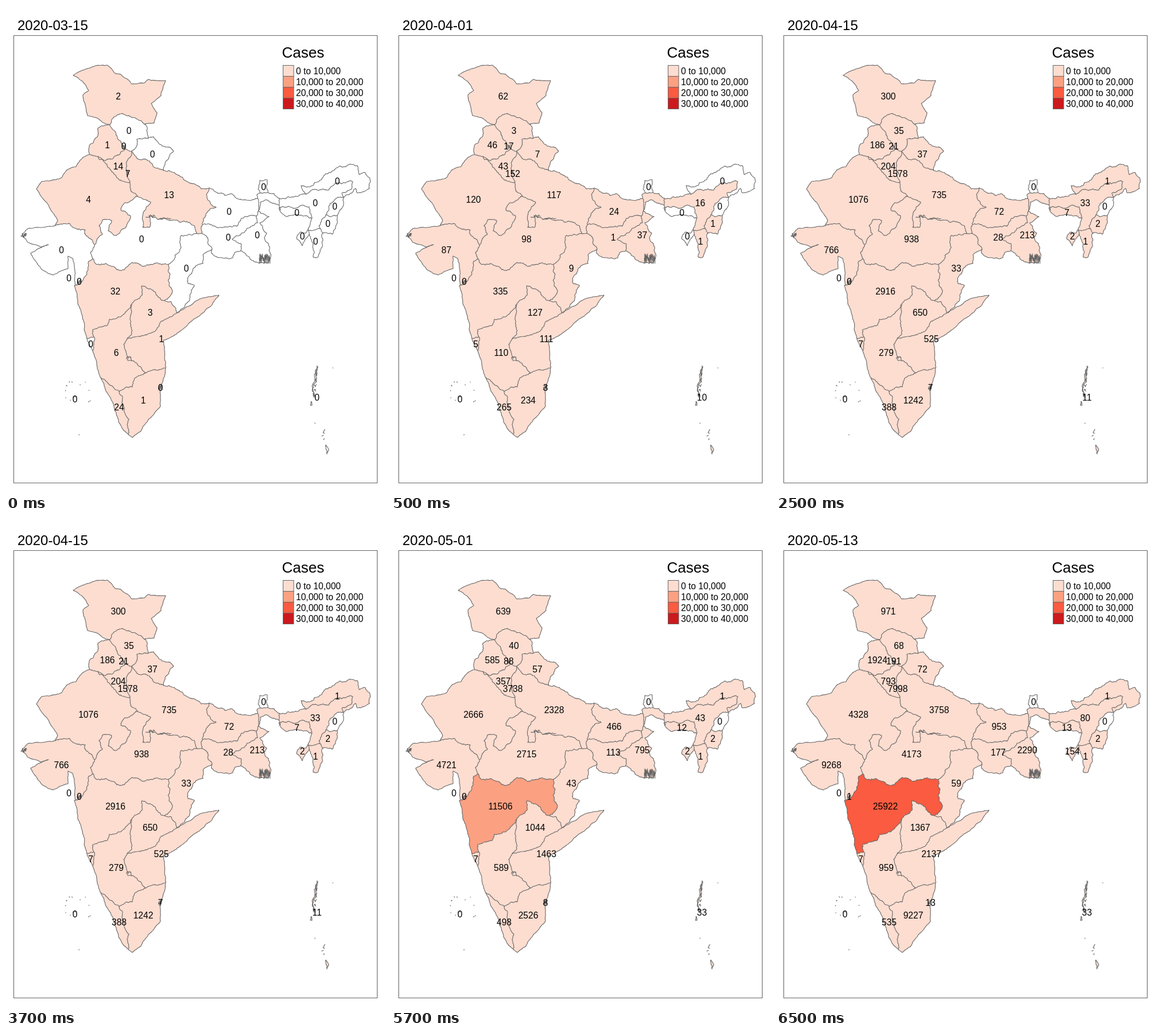
Animation, 660 px wide and 849 px high, one loop 8000 ms. Source, as an HTML page:

```html
<!DOCTYPE html>
<html lang="en">
<head>
<meta charset="utf-8">
<style>
html, body { margin: 0; width: 100%; height: 100%; overflow: hidden; background: #fff; }
svg { display: block; font-family: "Liberation Sans", Arial, sans-serif; font-size: 15.6px; }
#lines, #specks, .box { fill: none; stroke: #666; stroke-width: 1.1; stroke-linejoin: round; }
#labels { text-anchor: middle; }
</style>
</head>
<body>
<svg width="660" height="849" viewBox="0 0 660 849">
  <rect class="box" x="13.5" y="51.5" width="633" height="780"/>
  <text id="date" x="20" y="42" font-size="24"></text>
  <text x="480.5" y="90" font-size="26">Cases</text>
  <g id="legend"></g>
  <g id="fills"></g>
  <g id="lines"></g>
  <g id="specks"></g>
  <g id="labels"></g>
</svg>
<script>
const dates = ['2020-03-15', '2020-04-01', '2020-04-15', '2020-05-01', '2020-05-13'];
const reds = ['#fdddd0', '#fca082', '#fb5b40', '#cb191d'];
const loop = 8000, hold = 2000, lead = 1500;
const nodes = {}, arcs = {}, states = [];
const byId = id => document.getElementById(id);

let seed = 7;
const rand = () => (seed = seed * 16807 % 2147483647) / 2147483647;

function add(parent, tag, attrs, text = '') {
  const el = document.createElementNS('http://www.w3.org/2000/svg', tag);
  for (const k in attrs) el.setAttribute(k, attrs[k]);
  el.textContent = text;
  return byId(parent).appendChild(el);
}

const toPath = pts => 'M' + pts.map(p => p.map(v => v.toFixed(1)).join(' ')).join('L');

// Splits a segment by midpoint displacement.
function jagged([x, y], [u, v], amp) {
  const dx = u - x, dy = v - y;
  if (Math.hypot(dx, dy) < 3) return [[u, v]];
  const off = (rand() * 2 - 1) * amp;
  const mid = [(x + u) / 2 - dy * off, (y + v) / 2 + dx * off];
  return [...jagged([x, y], mid, amp * 1.25), ...jagged(mid, [u, v], amp * 1.25)];
}

// A border through key points; "a=x,y" names a junction, "a" reuses it.
function arc(name, text, amp = .12) {
  const keys = text.split(' ').map(word => {
    const [id, xy] = word.includes('=') ? word.split('=') : [word, word];
    return nodes[id] = nodes[id] || xy.split(',').map(Number);
  });
  const pts = [keys[0]];
  for (let i = 1; i < keys.length; i++) pts.push(...jagged(keys[i - 1], keys[i], amp));
  arcs[name] = pts;
  add('lines', 'path', { d: toPath(pts) });
}
const coast = (name, text) => arc(name, text, .05);

// Joins borders into a ring, turning each one so that it meets the last.
function ring(names) {
  const out = [];
  for (const name of names.split(' ')) {
    const pts = arcs[name];
    const turned = out.length && pts[0] !== out[out.length - 1] && pts[pts.length - 1].join() === out[out.length - 1].join();
    out.push(...(turned ? [...pts].reverse() : pts));
  }
  return toPath(out) + 'Z';
}

// Counts hold their last value once the list ends.
function state(x, y, names, ...counts) {
  states.push({
    counts,
    area: names && add('fills', 'path', { d: ring(names) }),
    label: add('labels', 'text', { x, y: y + 5.5 })
  });
}

function scribble(x, y, w, h, n) {
  const pts = Array.from({ length: n }, (_, i) => [x + w * (i + rand()) / n, y + h * rand()]);
  add('specks', 'path', { d: toPath(pts) });
}

// North
coast('jk', 'b=180,207 168,203 160,196 142,191 139,177 135,165 134,155 144,147 133,131 117,121 133,112 156,104 176,103 191,118 200,119 219,136 241,134 248,128 278,130 270,156 253,170 263,186 258,204 a=241,206');
arc('jk-hp', 'a 228,197 204,188 189,193 b');
arc('hp', 'a 246,213 h=247,231');
arc('hp-uk', 'h 228,232 227,245 f=219,253');
arc('hp-hr', 'f e=208,249');
arc('hp-pb', 'e 200,236 184,213 b');
arc('pb', 'b 160,213 161,222 145,244 c=145,259');
arc('pb-rj', 'c d=160,262');
arc('pb-hr', 'd 163,268 184,267 198,259 e');
arc('uk', 'h 257,228 292,253 279,270 i=275,287');
arc('uk-up', 'i 260,282 245,268 229,266 f');
arc('hr-up', 'f 210,272 213,301 g=216,307');
arc('hr-rj', 'g 206,306 194,300 188,293 176,276 d');
coast('rj', 'c 134,264 122,280 107,285 97,299 76,305 62,306 53,319 62,333 69,341 90,374 p=85,383');
arc('rj-gj', 'p 110,379 122,388 138,390 137,397 o=154,416');
arc('rj-mp', 'o 168,398 162,383 168,373 184,374 178,392 188,400 210,384 217,366 200,356 205,345 n=229,331');
arc('rj-up', 'n 217,322 g');
arc('up', 'i 303,297 324,310 340,319 j=354,317');
arc('up-br', 'j 349,329 366,351 355,354 k=342,381');
arc('up-jh', 'k l=341,396');
arc('up-cg', 'l m=333,397');
arc('up-mp', 'm 328,383 310,375 276,370 249,365 250,386 238,386 238,365 252,342 n');

// East
arc('br', 'j 365,324 398,331 425,339 A=438,335');
arc('br-wb', 'A 440,346 B=436,366');
arc('br-jh', 'B 410,370 402,384 372,386 k');
arc('jh-cg', 'l 349,401 C=359,424');
arc('jh', 'C 358,431 395,439 398,430 D=409,427');
arc('jh-wb', 'D 409,414 394,407 416,393 438,378 B');
arc('sk', 'E=443,326 439,319 442,304 455,303 F=456,325');
arc('sk-wb', 'F E');
arc('wb-nw', 'A 437,329 E');
arc('wb-ne', 'F 467,327 G=476,335');
arc('wb-as', 'G H=475,347');
arc('wb', 'H 454,338 443,342 440,358 458,367 442,378 454,396 450,404 460,441 457,448 427,443 D');

// Northeast
arc('as', 'G 508,332 I=523,328');
arc('ar', 'I 514,313 530,315 556,293 581,279 611,278 615,294 624,290 633,299 633,318 612,326 609,318 J=588,333');
arc('ar-as', 'J 585,326 602,319 604,306 577,308 562,321 I');
arc('as-nl', 'J 574,336 K=557,364');
arc('as-mn', 'K 545,383 L=547,388');
arc('as-mz', 'L 535,391 M=526,390');
arc('as-s', 'M N=533,370');
arc('as-ml', 'N 528,350 516,347 506,352 475,352 O=477,357');
arc('as-w', 'O H');
arc('ml', 'O 490,367 N');
arc('nl', 'J 588,345 P=577,365');
arc('nl-mn', 'P K');
arc('mn', 'P 577,378 568,398 Q=552,396');
arc('mn-mz', 'Q L');
arc('mz', 'Q 546,430 543,438 535,438 R=528,398');
arc('tr-mz', 'R M');
arc('tr', 'M 522,396 513,394 506,404 516,418 R');

// West and centre
coast('gj', 'p 38,388 28,400 38,412 60,420 74,416 43,431 63,460 82,469 108,458 108,436 116,440 120,460 q=121,487');
arc('gj-mh', 'q 134,478 143,460 144,445 r=152,441');
arc('gj-mp', 'r 147,430 o');
arc('mp-cg', 'm 305,400 305,420 s=283,450');
arc('mp-mh', 's 236,453 220,447 206,460 157,450 r');
arc('cg-mh', 's 284,488 290,496 t=276,514');
arc('cg-tg', 't 288,516 u=297,535');
arc('cg', 'C 343,434 343,449 328,456 317,484 328,487 320,505 u');
coast('mh', 'q 119,487 125,515 136,564 v=141,580');
arc('mh-ga', 'v w=153,577');
arc('mh-ka', 'w 151,564 177,556 180,546 201,541 x=219,520');
arc('mh-tg', 'x 237,501 236,488 260,499 271,513 t');

// South
arc('tg-ap', 'u 268,553 257,568 231,576 y=211,580');
arc('tg-ka', 'y 219,571 218,530 x');
coast('ap', 'u 308,529 342,509 371,504 358,522 325,548 292,575 274,583 z=278,631');
arc('ap-tn', 'z 265,635 S=243,640');
arc('ap-ka', 'S 236,631 212,618 210,606 205,590 y');
coast('ga', 'v T=151,601');
arc('ga-ka', 'T w');
coast('ka', 'T 158,621 U=165,648');
arc('ka-kl', 'U 179,659 V=197,672');
arc('ka-tn', 'V 220,664 225,648 S');
coast('kl', 'U 187,694 196,725 205,740 W=213,747');
arc('kl-tn', 'W 214,720 206,703 203,682 V');
coast('tn', 'z 269,668 269,698 249,720 235,741 220,752 W');

// Islands
arc('an', 'X=542,627 540,652 536,679 534,670 538,650 X');
arc('an-s', 'Y=531,689 533,696 530,696 Y');
arc('nicobar', 'Z=557,765 562,773 559,781 Z');

state(195.5, 157, 'jk jk-hp', 2, 62, 300, 639, 971);
state(214, 217, 'hp hp-uk hp-hr hp-pb jk-hp', 0, 3, 35, 40, 68);
state(176.5, 242, 'pb pb-rj pb-hr hp-pb', 1, 46, 186, 585, 1924);
state(205, 244.5, '', 0, 17, 21, 88, 191);
state(255, 258, 'uk uk-up hp-uk', 0, 7, 37, 57, 72);
state(195.5, 279, 'pb-hr hp-hr hr-up hr-rj', 14, 43, 204, 357, 793);
state(212, 292, '', 7, 152, 1578, 3738, 7998);
state(143.5, 337, 'rj rj-gj rj-mp rj-up hr-rj pb-rj', 4, 120, 1076, 2666, 4328);
state(284, 329.5, 'up up-br up-jh up-cg up-mp rj-up hr-up uk-up', 13, 117, 735, 2328, 3758);
state(388.5, 358, 'br br-wb br-jh up-br', 0, 24, 72, 466, 953);
state(448.5, 315.5, 'sk sk-wb', 0);
state(577, 305, 'ar ar-as', 0, 0, 1);
state(538.5, 343, 'as ar-as as-nl as-mn as-mz as-s as-ml as-w wb-as', 0, 16, 33, 43, 80);
state(572.5, 349.5, 'nl nl-mn as-nl', 0);
state(506.5, 360.5, 'as-ml ml', 0, 0, 7, 12, 13);
state(560.5, 379, 'mn mn-mz as-mn nl-mn', 0, 1, 2);
state(516, 401, 'tr tr-mz', 0, 0, 2, 2, 154);
state(539, 410.5, 'mz tr-mz as-mz mn-mz', 0, 1);
state(437.5, 399.5, 'wb-nw sk-wb wb-ne wb-as wb jh-wb br-wb', 0, 37, 213, 795, 2290);
state(387, 403, 'br-jh up-jh jh-cg jh jh-wb', 0, 1, 28, 113, 177);
state(236, 406, 'rj-mp up-mp mp-cg mp-mh gj-mp', 0, 98, 938, 2715, 4173);
state(314, 457, 'cg cg-tg cg-mh mp-cg up-cg jh-cg', 0, 9, 33, 43, 59);
state(96.5, 425, 'gj gj-mh gj-mp rj-gj', 0, 87, 766, 4721, 9268);
state(109.5, 474, '', 0);
state(127.5, 480.5, '', 0, 0, 0, 0, 1);
state(190.5, 497.5, 'mh mh-ga mh-ka mh-tg cg-mh mp-mh gj-mh', 32, 335, 2916, 11506, 25922);
state(251, 534, 'mh-tg cg-tg tg-ap tg-ka', 3, 127, 650, 1044, 1367);
state(270.5, 580.5, 'ap ap-tn ap-ka tg-ap', 1, 111, 525, 1463, 2137);
state(147.5, 589, 'ga ga-ka mh-ga', 0, 5, 7);
state(192, 604, 'ka ka-kl ka-tn ap-ka tg-ka mh-ka ga-ka', 6, 110, 279, 589, 959);
state(197, 699.5, 'kl kl-tn ka-kl', 24, 265, 388, 498, 535);
state(239, 687, 'tn kl-tn ka-tn ap-tn', 1, 234, 1242, 2526, 9227);
state(269, 665, '', 0, 3, 7, 8, 13);
state(120, 685, '', 0);
state(541.5, 682.5, 'an', 0, 10, 11, 33);
for (const name of ['an-s', 'nicobar'])
  states.push({ ...states[states.length - 1], area: add('fills', 'path', { d: ring(name) }) });

// Deltas, enclaves and islets
scribble(441, 432, 19, 17, 70);
scribble(26, 396, 10, 8, 26);
scribble(243, 364, 18, 5, 20);
scribble(263, 369, 25, 3, 14);
scribble(208, 286, 6, 9, 8);
scribble(202, 241, 7, 8, 10);
scribble(124, 476, 7, 9, 14);
scribble(265, 660, 6, 9, 14);
scribble(209, 611, 10, 10, 9);
for (let i = 0; i < 6; i++) scribble(539 - i, 629 + i * 9, 5, 9, 5);
for (let i = 0; i < 4; i++) scribble(549 + rand() * 4, 738 + i * 5, 4, 4, 4);
const dot = (x, y) => scribble(x, y, 2, 2, 3);
for (let i = 0; i < 14; i++) dot(100 + 48 * rand(), 655 + 37 * rand());
dot(126, 746);
dot(568, 630);
dot(537, 726);

reds.forEach((fill, i) => {
  const y = 103.5 + 19 * i, comma = n => n.toLocaleString('en-US');
  add('legend', 'rect', { x: 482.5, y, width: 18.5, height: 19, fill, stroke: '#666' });
  add('legend', 'text', { x: 505, y: y + 15.2 }, comma(i * 10000) + ' to ' + comma((i + 1) * 10000));
});

let shown = -1;
function draw() {
  const t = performance.now() % loop;
  const step = Math.floor((t + lead) / hold);
  if (step !== shown) {
    shown = step;
    byId('date').textContent = dates[step];
    for (const { counts, area, label } of states) {
      const n = counts[Math.min(step, counts.length - 1)];
      label.textContent = n;
      if (area) area.setAttribute('fill', n ? reds[Math.floor(n / 10000)] : '#fff');
    }
  }
  requestAnimationFrame(draw);
}
draw();
</script>
</body>
</html>
```
